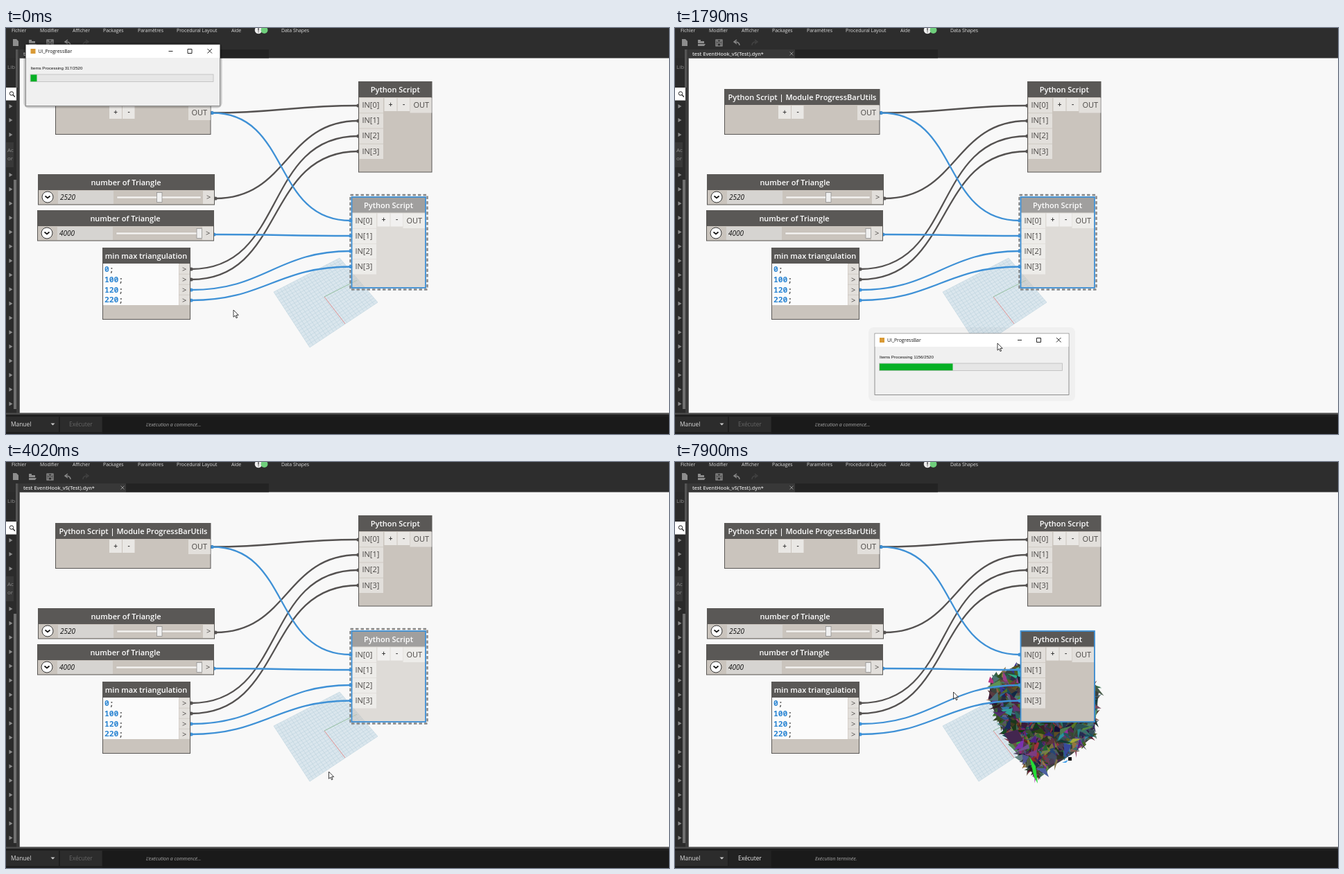
An HTML page that plays this animation: 956x586 px, repeating every 8 s.

```html
<!DOCTYPE html>
<html lang="fr">
<head>
<meta charset="utf-8">
<title>Progress bar in a node graph</title>
<style>
  html, body { margin: 0; width: 100%; height: 100%; overflow: hidden; background: #f8f8f8; }
  svg { display: block; width: 956px; height: 586px; font-family: "Open Sans", "Noto Sans", sans-serif; }
  text { white-space: pre; }
  .head { font-size: 11px; font-weight: 600; fill: #fff; text-anchor: middle; }
  .port { font-size: 11px; fill: #4b4846; }
  .sign { font-size: 10px; font-weight: 600; fill: #333; text-anchor: middle; }
  .code { font: 600 11.3px "Noto Sans Mono", "DejaVu Sans Mono", monospace; fill: #2c86d3; }
  .value { font-size: 10px; font-style: italic; fill: #111; }
  .bar { font-size: 6.9px; fill: #ddd; }
  .tab { font-size: 7.3px; font-weight: 600; fill: #ddd; }
  .side { font-size: 8px; fill: #8a8a8a; }
  .run { font-size: 8.4px; fill: #ddd; }
  .status { font-size: 7px; font-style: italic; fill: #aaa; }
  .title { font-size: 6.85px; fill: #111; }
  .items { font: 6.2px "Liberation Sans", Arial, sans-serif; fill: #111; }
  .item { font-size: 7px; fill: #222; }
  .off { fill: #999; }
</style>
</head>
<body>
<svg id="stage" viewBox="0 0 956 586">
  <rect width="956" height="586" fill="#f8f8f8"/>
  <g id="grid"></g>
  <rect id="dash" x="496.500" y="241" width="111" height="136.500" fill="none" stroke="#858585" stroke-width="2.400" stroke-dasharray="4.500 3"/>
  <g id="mesh"></g>
  <g id="wires" fill="none" stroke-width="2.3"></g>
  <g id="nodes"></g>
  <g id="chrome"></g>
  <g id="dialog">
    <rect id="halo" rx="7"/>
    <rect width="280" height="88.5" fill="#f0f0f0" stroke="#777" stroke-width=".8"/>
    <rect x=".4" y=".4" width="279.2" height="18.6" fill="#fff"/>
    <rect x="7" y="6" width="7" height="7" fill="#d99a35"/>
    <text class="title" x="18" y="12">UI_ProgressBar</text>
    <path d="M206 9.5h6M233.500 6.500h6v6h-6zM262 6l6.500 6.500m0-6.500l-6.500 6.500" fill="none" stroke="#111" stroke-width=".9"/>
    <text id="count" class="items" x="7" y="36"></text>
    <rect x="6.500" y="43" width="264" height="10.500" fill="#e6e6e6" stroke="#bcbcbc" stroke-width=".8"/>
    <rect id="fill" x="7" y="43.400" height="9.800" fill="#06b025"/>
  </g>
  <g id="menu"></g>
  <g id="cursor">
    <circle id="ring" cx="1" cy="2" r="6" fill="none" stroke="#333" stroke-width=".9"/>
    <path d="M0 0V10.200L2.400 8L4 11.700L5.600 11L4 7.400H7.200Z" fill="#fff" stroke="#111" stroke-width=".8"/>
  </g>
</svg>
<script>
const $ = id => document.getElementById(id);
const add = (id, markup) => $(id).insertAdjacentHTML('beforeend', markup);
const rect = (x, y, w, h, fill, more = '') => `<rect x="${x}" y="${y}" width="${w}" height="${h}" fill="${fill}" ${more}/>`;
const text = (x, y, s, cls, more = '') => `<text x="${x}" y="${y}" class="${cls}" ${more}>${s}</text>`;
const path = (d, stroke, more = '') => `<path d="${d}" fill="none" stroke="${stroke}" ${more}/>`;
const mix = (a, b, k) => a.map((v, i) => v + (b[i] - v) * k);

const BODY = '#cac4bd', HEAD = '#5a5856', CELL = 'rgba(255,255,255,.45)', BUTTON = 'rgba(255,255,255,.6)';
const DARK = '#555251', BLUE = '#3f91d6';

// ground grid, seen in perspective
const corners = [[386, 381], [481, 332], [536, 396], [438, 461]];
const [west, north, east, south] = corners;
let lines = '';
for (let i = 0; i <= 20; i++) {
  const k = i / 20;
  lines += `M${mix(west, north, k)}L${mix(south, east, k)}M${mix(west, south, k)}L${mix(north, east, k)}`;
}
add('grid', `<polygon points="${corners.join(' ')}" fill="#dae6ed"/>`
  + path(lines, '#b4ccd9', 'stroke-width=".5"')
  + path('M459 388L489 427', '#e08585', 'stroke-width=".9"')
  + path('M459 388L506 364', '#86b78d', 'stroke-width=".8"'));

// cloud of random triangles, paler towards the top
let seed = 41;
const rnd = () => (seed = seed * 16807 % 2147483647) / 2147483647;
const hull = [[536, 278], [566, 287], [594, 303], [611, 332], [607, 365], [604, 395], [572, 422], [543, 440],
  [522, 456], [504, 436], [482, 405], [464, 370], [453, 340], [455, 314], [484, 298], [510, 290]];
const mid = [530, 358];
let cloud = `<polygon points="${hull.join(' ')}" fill="#3c423d"/>`;
for (let i = 0; i < 1000; i++) {
  const n = Math.floor(rnd() * hull.length);
  const reach = Math.sqrt(rnd());
  const [x, y] = mix(mid, mix(hull[n], hull[(n + 1) % hull.length], rnd()), reach);
  const a = Math.atan2(y - mid[1], x - mid[0]) + (rnd() - .5) * 2.6;
  const len = 5 + rnd() * 7, wide = 2 + rnd() * 4;
  const c = Math.cos(a), s = Math.sin(a);
  const pts = [[len, 0], [-len, wide], [-len * rnd(), -wide]]
    .map(([u, v]) => [(x + u * c - v * s).toFixed(1), (y + u * s + v * c).toFixed(1)]);
  const hue = Math.floor(rnd() * 360), sat = 12 + rnd() * 48;
  const light = 14 + rnd() * (18 + 16 * reach) + Math.max(0, (310 - y) / 2);
  cloud += `<polygon points="${pts.join(' ')}" fill="hsl(${hue} ${sat.toFixed()}% ${light.toFixed()}%)"/>`;
}
cloud += '<path d="M474 392l20-6 8 16-17 5z" fill="#43264f"/><path d="M511 425l9 14 3 25-5-9z" fill="#25dd35"/>'
  + rect(567, 426, 5, 5, '#111') + '<path d="M558 434l9-4-3 4z" fill="#3b9be8"/>';
add('mesh', cloud);

// wires: the bend grows with the distance between the ports
function wire(x1, y1, x2, y2, color) {
  const bend = Math.hypot(x2 - x1, y2 - y1) * .45;
  add('wires', path(`M${x1} ${y1}C${x1 + bend} ${y1} ${x2 - bend} ${y2} ${x2} ${y2}`, color)
    + `<circle cx="${x1}" cy="${y1}" r="2.600" fill="${color}"/><circle cx="${x2}" cy="${y2}" r="2.600" fill="${color}"/>`);
}
wire(297, 122.5, 508, 112, DARK);
wire(302, 246, 508, 134, DARK);
wire(267, 348, 508, 156, DARK);
wire(267, 363, 508, 178, DARK);
wire(297, 122.5, 497, 278, BLUE);
wire(300, 298, 497, 300, BLUE);
wire(267, 378, 497, 322, BLUE);
wire(267, 393, 497, 344.5, BLUE);

// nodes
const box = (x, y, w, h, headH) => rect(x, y, w, h, BODY, `stroke="${HEAD}" stroke-width="1"`) + rect(x, y, w, headH, HEAD);
const buttons = (x, y) => rect(x, y, 18, 19, BUTTON) + rect(x + 19, y, 17.5, 19, BUTTON)
  + text(x + 9, y + 12.5, '+', 'sign') + text(x + 28, y + 12.5, '-', 'sign');

add('nodes', box(71.5, 88.5, 223.5, 65, 22.5) + text(183.5, 104, 'Python Script | Module ProgressBarUtils', 'head')
  + buttons(149, 112) + rect(263, 112, 32, 21, CELL) + text(267.5, 126, 'OUT', 'port'));

function slider(x, y, value, thumb) {
  add('nodes', box(x + .5, y + .5, 254, 43.5, 22.5) + text(x + 127, y + 16, 'number of Triangle', 'head')
    + rect(x + 29, y + 24, 80, 19, '#d6d4d1') + text(x + 32, y + 37, value, 'value')
    + `<circle cx="${x + 14}" cy="${y + 33}" r="8" fill="#fff" stroke="#333"/>`
    + path(`M${x + 10.5} ${y + 31.5}l3.500 3 3.500-3`, '#111', 'stroke-width="1.700"')
    + rect(x + 114, y + 32, 121, 3, '#f4f2f0', 'stroke="#b5b0aa" stroke-width=".4"')
    + rect(thumb, y + 26.5, 7.5, 14, '#f0f0f0', 'stroke="#888" stroke-width=".7"')
    + rect(x + 238, y + 24, 16, 19, CELL) + text(x + 243, y + 37, '&gt;', 'port'));
}
slider(46, 211, '2520', 217.5);
slider(45, 263, '4000', 275);

let block = box(139.5, 317.5, 126, 103, 22.5) + text(202, 333, 'min max triangulation', 'head')
  + rect(140, 340, 109, 60, '#fbfbfb');
['0', '100', '120', '220'].forEach((n, i) => {
  block += text(142, 352 + i * 14.8, n + '<tspan fill="#555">;</tspan>', 'code')
    + rect(249.5, 340.5 + i * 15, 15.5, 14.3, CELL) + text(254, 351.5 + i * 15, '&gt;', 'port');
});
add('nodes', block);

function script(x, y, w, h, id) {
  let cells = buttons(x + 37, y + 23.5) + rect(x + 74, y + 23.5, 32, 21.5, CELL)
    + text(x + w / 2, y + 15.5, 'Python Script', 'head') + text(x + 79, y + 37.5, 'OUT', 'port');
  for (let i = 0; i < 4; i++) {
    cells += rect(x + 1, y + 23.5 + i * 22.2, 34.5, 21.4, CELL)
      + text(x + 5, y + 37.5 + i * 22.2, `IN[${i}]`, 'port');
  }
  add('nodes', `<g id="${id}">${box(x, y, w, h, 22.5)}</g>${cells}`);
}
script(508.5, 77.5, 105.5, 130.5, 'upper');
script(498.5, 244, 106, 131, 'lower');
add('nodes', rect(498.5, 244, 106.5, 131, 'none', `stroke="${BLUE}" stroke-width="1.800"`));

// application frame
let ui = rect(0, 0, 956, 43.5, '#2d2d2d') + rect(20, 31, 153, 12.5, '#383838') + rect(173, 31, 206, 12.5, '#232323');
[['Fichier', 8], ['Modifier', 49], ['Afficher', 96], ['Packages', 140], ['Paramètres', 190],
  ['Procedural Layout', 246], ['Aide', 325], ['Data Shapes', 397]].forEach(([s, x]) => ui += text(x, 5.8, s, 'bar'));
ui += '<circle cx="364" cy="3" r="5.300" fill="#eee"/><circle cx="372.500" cy="3" r="5" fill="#6fcf7c"/>'
  + rect(363.4, 0, 1.2, 4, '#333') + rect(363.4, 5, 1.2, 1.2, '#333')
  + '<path d="M10 16h5l3 3v7h-8zM33 17h4v2h5v3h-9zM33 23h11l-2 3h-9z" fill="#8d8d8d"/>'
  + path('M59 17h9v9h-9zM61 17v3h5v-3M61 26v-4h5v4', '#999', 'stroke-width="1.200"')
  + path('M93 25c0-4-3-5-7-5m3-3l-4 3 4 3', '#888', 'stroke-width="1.500"')
  + path('M111 25c0-4 3-5 6-5m-2-3l4 3-4 3', '#444', 'stroke-width="1.300"')
  + text(25, 39.5, 'test EventHook_v5(Test).dyn*', 'tab')
  + path('M165.500 34.500l5 5m0-5l-5 5', '#999', 'stroke-width=".9"')
  + rect(0, 43, 19.5, 515, '#2b2b2b') + rect(15, 31, 4.5, 527, '#3b3b3b') + rect(14, 31, 3, 55, '#555')
  + rect(0, 165, 11, 36, '#383838')
  + text(2, 59, 'Lib', 'side') + text(2, 179, 'Ac', 'side') + text(2, 191, 'or', 'side')
  + rect(0, 86, 15, 18.5, '#fff') + '<circle cx="8" cy="94.500" r="2.700" fill="none" stroke="#222"/>'
  + path('M10 96.500l3 3', '#222', 'stroke-width="1.200"') + rect(11, 219, 4, 331, '#707070');
const arrow = y => ui += `<path d="M4.500 ${y - 3}l5 3-5 3z" fill="#8a8a8a"/>`;
[113, 133, 154].forEach(arrow);
for (let i = 0; i < 17; i++) arrow(212 + i * 20.65);
ui += rect(0, 556, 956, 30, '#1f1f1f') + rect(0, 555.5, 956, 2.5, '#4a4a4a')
  + rect(0, 561, 76, 22, '#2c2c2c') + rect(78, 561, 60.5, 22, '#2c2c2c', 'id="runBox"') + rect(139, 561, 817, 25, '#1a1a1a')
  + text(7, 575, 'Manuel', 'run') + '<path d="M64.500 570.500h6l-3 3z" fill="#ccc"/>'
  + text(91, 575, 'Exécuter', 'run', 'id="run"') + text(202, 574.5, '', 'status', 'id="status"');
add('chrome', ui);

// context menu
const rowY = i => 317.5 + i * 13.86;
let menu = rect(565, 311, 128, 156, '#000', 'opacity=".25"') + rect(563.5, 309.5, 127.5, 155.5, '#f2f2f2', 'stroke="#999"')
  + rect(580.5, 311, .7, 153, '#ddd')
  + rect(565, 0, 124, 13, '#c4e0ee', 'id="hover" stroke="#6db4d6" stroke-width=".8"');
['Supprimer', 'Créer un groupe', 'Supprimer du groupe', 'Ajouter au groupe', 'Geler', 'Aperçu', 'Afficher les libellés',
  'Renommer le noeud...', 'Résultat effectif', 'Aide...', 'Modifier...'].forEach((s, i) => {
  const y = rowY(i);
  if (i === 4 || i === 5) menu += rect(565.5, y - 6.5, 12.5, 13, '#c4e0ee', 'stroke="#8fc3de" stroke-width=".6"')
    + path(`M569 ${y}l2 2.200 3.800-4.500`, '#111', 'stroke-width="1.300"');
  menu += text(586.5, y + 2.6, s, i === 2 || i === 3 ? 'item off' : 'item');
});
add('menu', menu);

// timing: [start, steps, step length]
const LOOP = 8000;
const runs = [[0, 1, 110], [110, 34, 118.5], [4890, 3, 110], [6360, 2, 120], [6730, 5, 120], [7450, 5, 112.5]];
function hold(t) {
  const [start, n, d] = runs.filter(r => r[0] <= t).pop();
  return start + d * Math.min(n - 1, Math.floor((t - start) / d + .05));
}
function at(keys, t) {
  let i = 0;
  while (i < keys.length - 2 && keys[i + 1][0] <= t) i++;
  const a = keys[i], b = keys[i + 1];
  const k = Math.min(1, Math.max(0, (t - a[0]) / (b[0] - a[0])));
  return mix(a, b, k).slice(1);
}
const pointer = [[0, 328, 407], [230, 328, 407], [585, 262, 200], [821, 214, 62], [939, 205, 37], [1058, 205, 37],
  [1176, 255, 120], [1295, 345, 285], [1413.5, 421.5, 405.5], [1661, 460, 468], [1769, 465, 455], [1888, 465.5, 447],
  [4890, 465.5, 447], [5110, 563.5, 309], [6480, 563.5, 309], [6730, 572, 318], [6850, 589.5, 340], [7090, 596, 364],
  [7210, 598, 369], [7450, 598, 369], [7900, 401.5, 332]];
const windowAt = [[0, 28.5, 24], [1058, 28.5, 24], [1176, 78, 100], [1295, 160, 255], [1413.5, 235.5, 378],
  [1661, 283, 454], [1769, 288, 441], [1888, 289, 434], [2000, 289, 434]];
const done = [[0, 317], [930, 930], [1413.5, 1097], [2124.5, 1215], [4020, 2520]];
const barWidth = [[0, 9], [930, 80], [1413.5, 96], [2124.5, 115], [3310, 185], [3905, 245]];

const show = (id, on) => $(id).style.display = on ? '' : 'none';
const move = (id, [x, y]) => $(id).setAttribute('transform', `translate(${x} ${y})`);
const set = (id, attrs) => { for (const k in attrs) $(id).setAttribute(k, attrs[k]); };

function draw(time) {
  const t = hold(time);
  const finished = t >= 4890, frozen = t < 7560;

  move('cursor', at(pointer, t));
  show('ring', t > 930 && t < 1760);

  show('dialog', t < 4015);
  move('dialog', at(windowAt, t));
  $('count').textContent = `Items Processing ${Math.round(at(done, t)[0])}/2520`;
  set('fill', { width: at(barWidth, t)[0] });
  const [pad, shade] = t < 1050 ? [3, .2] : t < 1760 ? [5.5, .09] : [9, .03];
  set('halo', { x: -pad, y: -pad, width: 280 + 2 * pad, height: 88.5 + 2 * pad, 'fill-opacity': shade });

  show('mesh', finished);
  set('run', { style: `fill:${finished ? '#eee' : '#666'}` });
  set('runBox', { fill: finished ? '#222' : '#2c2c2c' });
  $('status').textContent = finished ? 'Exécution terminée.' : "L'exécution a commencé...";

  set('lower', { opacity: frozen ? .55 : 1 });
  show('dash', frozen);

  const row = t < 6730 ? -1 : t < 6840 ? 0 : t < 6960 ? 1 : t < 7080 ? -1 : 4;
  show('menu', t >= 6360 && t < 7440);
  show('hover', row >= 0);
  set('hover', { y: rowY(row) - 6.5 });
}

const begin = performance.now();
function tick() {
  draw((performance.now() - begin) % LOOP);
  requestAnimationFrame(tick);
}
tick();
</script>
</body>
</html>
```
